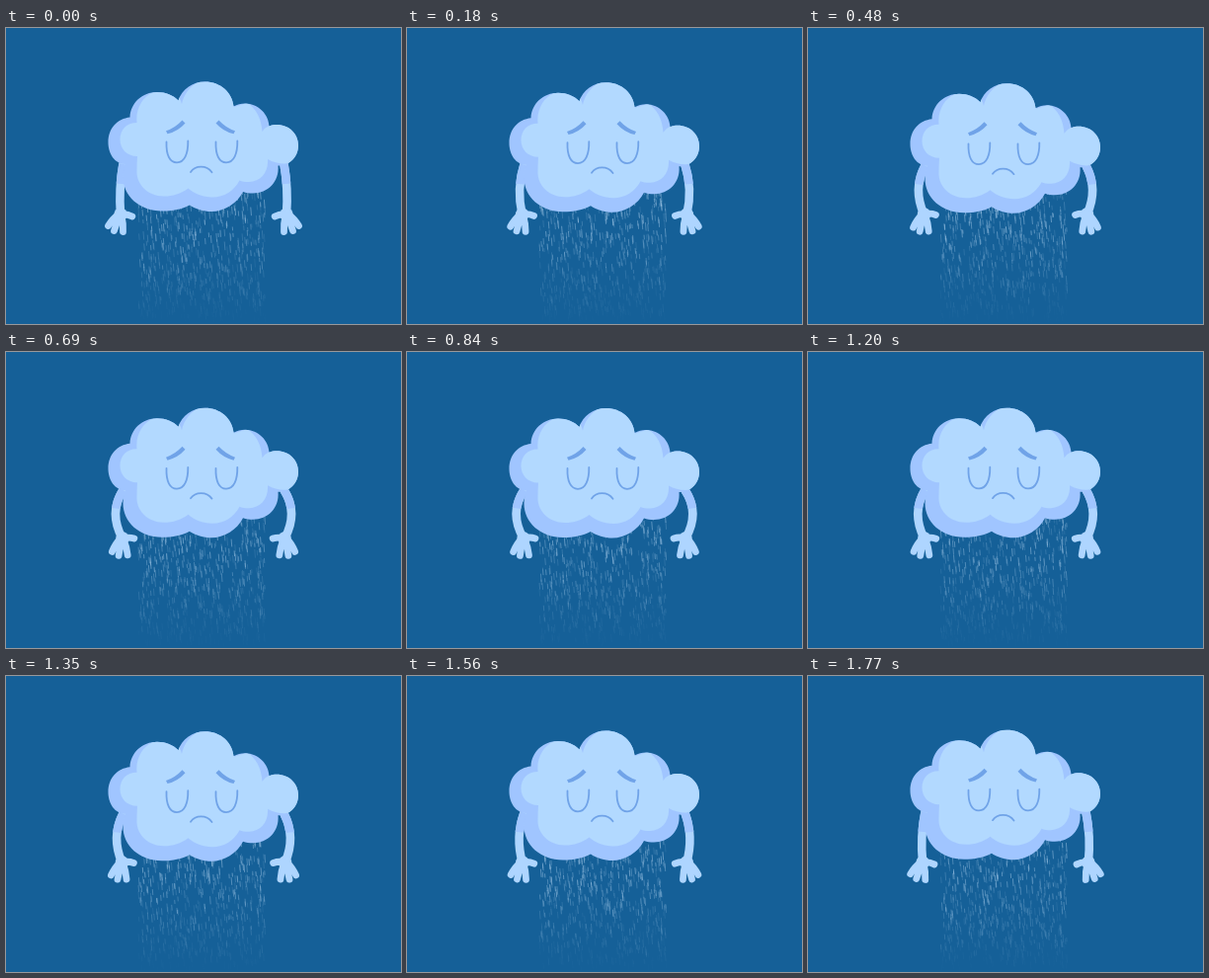
These frames come from a looping animation (400 by 300 pixels, 1.8 s). An HTML page:

```html
<!DOCTYPE html>
<html lang="en">
<head>
<meta charset="utf-8">
<title>Sad rain cloud</title>
<style>
  html, body { margin: 0; width: 100%; height: 100%; overflow: hidden; background: #156098; }
  svg { display: block; width: 100vw; height: 100vh; }
  .line { fill: none; stroke: #70a3e8; stroke-linecap: round; }
  .limb { fill: none; stroke: #aed5ff; stroke-linecap: round; }
  #shadow { stroke: #a0c5ff; stroke-dasharray: 20 99; stroke-linecap: butt; }
</style>
</head>
<body>
<svg viewBox="0 0 400 300">
  <defs>
    <clipPath id="inside"><use href="#outline"/></clipPath>
  </defs>
  <rect width="400" height="300" fill="#156098"/>
  <g id="rain" stroke="#b4d4f0" stroke-width="0.75" stroke-linecap="round"></g>
  <g id="arm">
    <path id="sleeve" class="limb" stroke-width="8.6"/>
    <path id="shadow" class="limb" stroke-width="8.6"/>
    <g id="hand">
      <circle r="6.8" fill="#aed5ff"/>
      <path class="limb" stroke-width="6.8" d="M-2 0Q-8 4-12.500 11.500M-1 1Q-4 9-6.500 16.500M1 1Q3 9 2.500 17.500M0 0Q6 -1 11.800 2"/>
    </g>
  </g>
  <use href="#arm" transform="translate(400 0) scale(-1 1)"/>
  <g id="cloud">
    <path id="outline" fill="#a0c5ff" d="M121 138C110 138 103.500 127 103.500 116
      C103.500 101 113 92 125.500 90.500C126 76 138 65 153 65C162 65 169 68 174.500 73.500
      C178 62 189 54.500 201.500 54.500C217 54.500 229 65 230.500 79.500C234 77.500 238 76.500 242 76.500
      C256 76.500 266 88 266.500 99.500C269 98.300 271.500 98 274 98C287 98 296 107.500 296 119
      C296 131 287 139.500 275.500 139.500C277 156 265 167.500 250 167.500C246.500 167.500 243 167 240 166
      C234 178 221 186 208 186C200 186 192 183.500 186 179.500C178 183.500 169 185.500 158 185.500
      C135 185.500 118.500 170 118.500 151C118.500 146 119.500 142 121 138Z"/>
    <path clip-path="url(#inside)" fill="#b2d9ff" d="M133 130C122 130 115.500 122 115.500 113
      C115.500 103 122 96 132.500 96C131 82 138 70 149 65L153 60H172L178 77C180 67 187 58 196 54
      L202 50L234 60L231 80L244 76C253 81 258.500 91 259.500 105Q262 101 266.500 99L272 95H300V130
      C290 140 276 139 265 133C266 146 258 155.500 246 156C242 156 239 155.500 236.500 154.500
      C231 165 221 171.500 209 171.500C199 171.500 191 168 184.500 162.500C177 168 169 170.500 160 170.500
      C143 170.500 132.500 158 132.500 146Q132.500 138 133 130Z"/>
    <g class="line" stroke-width="1.8">
      <path id="eye" d="M162.500 115.500C162 129 166 136.300 173 136.300C181 136.300 184.500 127 184.300 114.500"/>
      <use href="#eye" x="50"/>
      <path d="M187 146Q190.500 140.700 197.500 140.700T208.500 146.300"/>
    </g>
    <g fill="#70a3e8">
      <path id="brow" d="M162 104.300Q171 101.500 178.500 93.500L181.500 96.500Q174 105 163.500 107.300Z"/>
      <use href="#brow" transform="translate(394 0) scale(-1 1)"/>
    </g>
  </g>
</svg>
<script>
const LOOP = 1800, STEP = 30, DROPS = 720;
const RAIN_TOP = 155, RAIN_BOTTOM = 300;
const $ = id => document.getElementById(id);
const lerp = (a, b, k) => a + (b - a) * k;

function addLine() {
  const line = document.createElementNS("http://www.w3.org/2000/svg", "line");
  return $("rain").appendChild(line);
}

let seed = 17;
function random() {
  seed = (seed * 16807) % 2147483647;
  return seed / 2147483647;
}

const drops = Array.from({ length: DROPS }, () => ({
  x: lerp(134, 262, random()),
  phase: random(),
  laps: random() < 0.5 ? 2 : 3,
  length: lerp(3, 8, random()),
  alpha: lerp(0.15, 0.65, random()),
  node: addLine()
}));

function drawDrop({ node, x, phase, laps, length, alpha }, progress) {
  const fall = (phase + progress * laps) % 1;
  const y = lerp(RAIN_TOP, RAIN_BOTTOM, fall);
  const fade = Math.min(1, (RAIN_BOTTOM - y) / 95);
  node.setAttribute("x1", x);
  node.setAttribute("y1", y - length);
  node.setAttribute("x2", x + length * 0.08);
  node.setAttribute("y2", y);
  node.setAttribute("opacity", alpha * fade);
}

function draw(time) {
  const progress = Math.floor((time % LOOP) / STEP) * STEP / LOOP;
  const sag = Math.sin(Math.PI * progress);

  $("cloud").setAttribute("transform", `translate(0 ${2.5 * sag})`);

  const wristX = lerp(116, 118, sag), wristY = 189;
  const arm = `M118.5 ${138 + 2 * sag}Q${lerp(114, 103, sag)} 163 ${wristX} ${wristY}`;
  $("sleeve").setAttribute("d", arm);
  $("shadow").setAttribute("d", arm);
  $("hand").setAttribute("transform",
    `translate(${wristX} ${wristY}) rotate(${-10 * sag})`);

  for (const drop of drops) drawDrop(drop, progress);
}

const start = performance.now();
function tick() {
  draw(performance.now() - start);
  requestAnimationFrame(tick);
}
tick();
</script>
</body>
</html>
```
